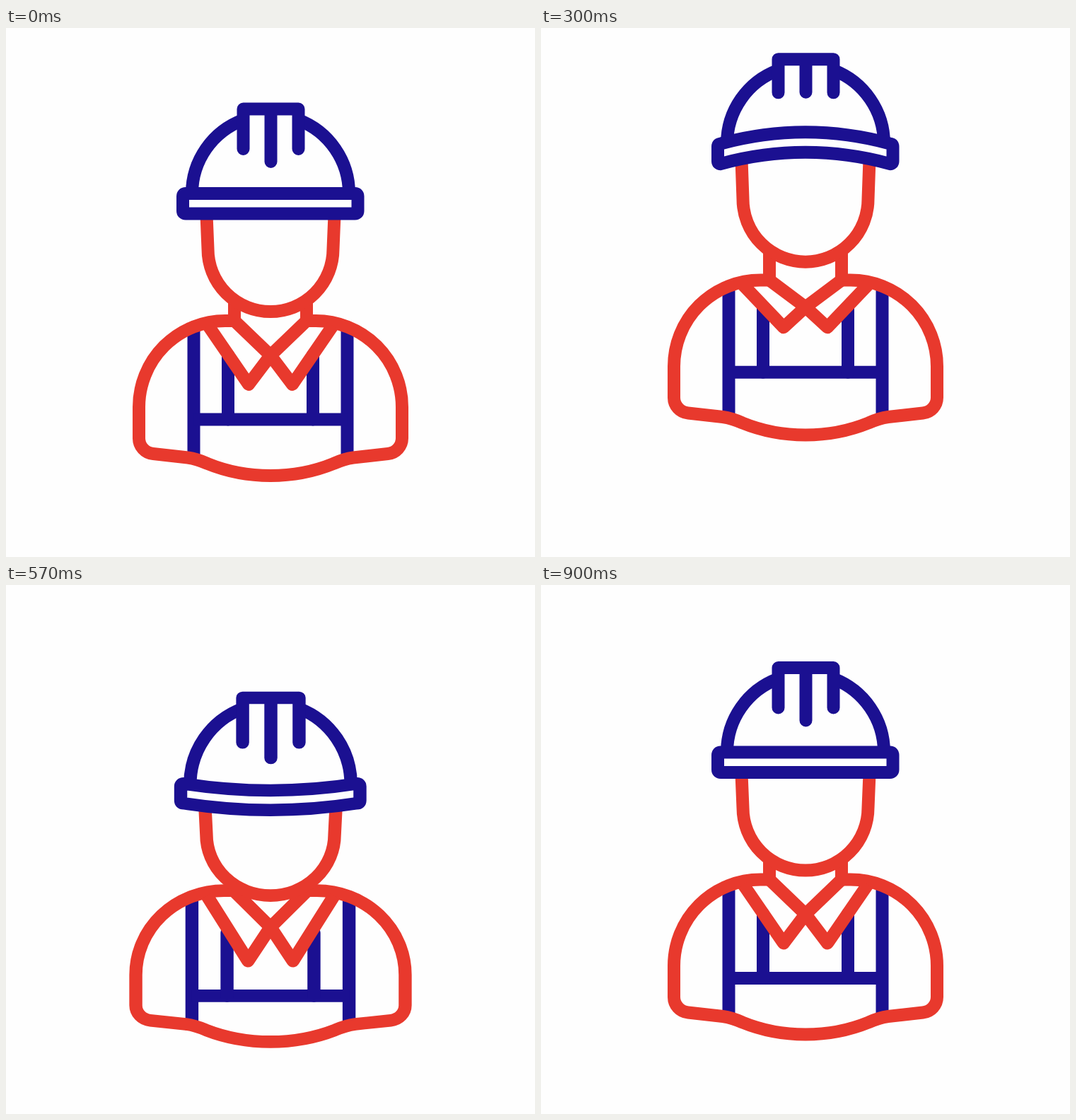
These frames come from a looping animation (748 px wide and 748 px high, 930 ms). An HTML page:

```html
<!DOCTYPE html>
<html lang="en">
<head>
<meta charset="utf-8">
<title>Jumping builder</title>
<style>
  html, body { margin: 0; width: 100%; height: 100%; overflow: hidden; background: #fefefe; }
  svg { display: block; width: 100vw; height: 100vh; }
  path { fill: none; stroke-width: 18; stroke-linejoin: round; }
  .blue { stroke: #1b1091; }
  .red { stroke: #e8392d; }
  .round { stroke-linecap: round; }
</style>
</head>
<body>
<svg viewBox="0 0 748 748">
  <g id="body">
    <path class="blue" d="M265.5 424V606M482.5 424V606"/>
    <path id="bib" class="blue"/>
    <path id="braces" class="blue round"/>
    <path class="red" d="M325 414H310A122 122 0 0 0 188 536V580A22 22 0 0 0 208 602L257 607.5C268 609 276 612 285 616C312 627 342 633 374 633S436 627 463 616C472 612 480 609 491 607.5L540 602A22 22 0 0 0 560 580V536A122 122 0 0 0 438 414H423"/>
    <path id="neck" class="red"/>
    <path id="collar" class="red"/>
  </g>
  <g id="head">
    <path id="face" class="red"/>
    <path id="dome" class="blue"/>
    <path id="ribs" class="blue round"/>
    <path id="brim" class="blue"/>
  </g>
</svg>
<script>
const LOOP = 930, STEP = 30;
const CROUCH = 90, PEAK = 350, LAND = 540, SETTLE = 570;
const DIP = 13, RISE = 77;

const el = id => document.getElementById(id);
const draw = (id, d) => el(id).setAttribute('d', d);

// Smooth 0 to 1 between two times
function ramp(t, from, to) {
  const u = Math.min(1, Math.max(0, (t - from) / (to - from)));
  return u * u * (3 - 2 * u);
}

// Crouch, leap, fall, then a damped bounce
function bodyAt(t) {
  if (t < CROUCH) return DIP * ramp(t, 0, CROUCH);
  if (t < SETTLE) {
    const span = t < PEAK ? PEAK - CROUCH : LAND - PEAK;
    const u = Math.min(1, Math.abs(t - PEAK) / span);
    return DIP - RISE + RISE * u ** 1.5;
  }
  const s = t - 600;
  return 13.5 * Math.exp(-.0033 * s) * Math.cos(Math.PI * s / 180);
}

// How far loose parts trail behind the body
const lagAt = t => 14 * (ramp(t, 0, CROUCH) - ramp(t, 660, 820))
  - 29.5 * (ramp(t, 140, 280) - ramp(t, 450, 560));

const squashAt = t => .022 * (ramp(t, 0, CROUCH) - ramp(t, CROUCH, 175))
  + .035 * (ramp(t, 520, 600) - ramp(t, 600, 740));

// Squash around a fixed height, then shift
function place(id, y, base, squash) {
  el(id).setAttribute('transform',
    `translate(374 ${base + y}) scale(${1 + squash} ${1 - squash}) translate(-374 ${-base})`);
}

function drawBody(lag, gap) {
  const trail = (down, up) => lag * (lag > 0 ? down : up);
  const bibY = 553.5 + trail(.92, .6), top = bibY - 91.5;
  const tipY = 504 + trail(.85, 1.5), crossY = 463 + trail(.28, .7);
  draw('bib', `M265.5 ${bibY}H482.5`);
  draw('braces', `M314 ${top}V${bibY}M434 ${top}V${bibY}`);
  draw('neck', `M323 ${386 + gap}V416M425 ${386 + gap}V416`);
  draw('collar', `M286 421L343 ${tipY}L374 ${crossY}L425 414M462 421L405 ${tipY}L374 ${crossY}L323 414`);
}

function drawHead(lag) {
  const drop = Math.max(0, lag);
  const faceY = 264 + lag * .5;
  draw('face', `M283.5 ${faceY}L285.5 312.5A88.5 88.5 0 0 0 462.5 312.5L464.5 ${faceY}`);

  const footY = 234 + drop * .45, arc = `A111 ${111 + drop * .45} 0 0 1`;
  draw('dome', `M263 ${footY}${arc} 335.5 130M413.5 130${arc} 485 ${footY}`);

  const sideY = 171 + lag * .6, midY = 189 + lag * (lag > 0 ? .9 : 1.8);
  draw('ribs', `M335.5 ${sideY}V114.5H413.5V${sideY}M374.5 114.5V${midY}`);

  const end = drop * .35, pull = lag * 2.1 - end;
  const top = 234 + end, low = 262.5 + end;
  draw('brim', `M254 ${top}Q374 ${234 + pull} 493.5 ${top}Q497.5 ${top} 497.5 ${top + 4}V${low - 4}`
    + `Q497.5 ${low} 493.5 ${low}Q374 ${262.5 + pull} 254 ${low}Q250 ${low} 250 ${low - 4}V${top + 4}Q250 ${top} 254 ${top}Z`);
}

function render(t) {
  const y = bodyAt(t), lag = lagAt(t), squash = squashAt(t);
  const gap = lag * (lag > 0 ? 1.8 : .83);
  place('body', y, 633, squash);
  place('head', y + gap, 401, squash);
  drawBody(lag, gap);
  drawHead(lag);
}

function tick() {
  const t = performance.now() % LOOP;
  render(Math.floor(t / STEP) * STEP);
  requestAnimationFrame(tick);
}
tick();
</script>
</body>
</html>
```
